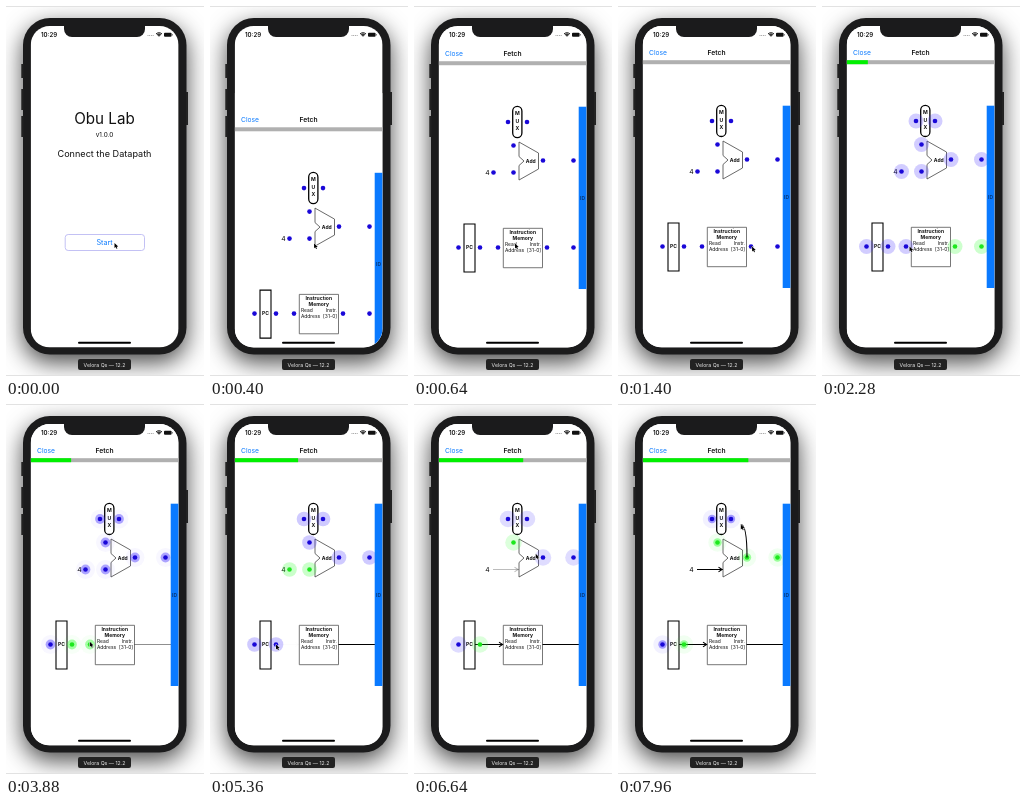
Write an HTML page with a canvas that moves like this. It is 198 px wide and 370 px high and loops after 8000 ms.

```html
<!DOCTYPE html>
<html lang="en">
<head>
<meta charset="utf-8">
<title>Datapath app demo</title>
<style>
html, body { margin: 0; width: 100%; height: 100%; overflow: hidden; background: #fff; }
canvas { display: block; width: 198px; height: 370px; }
</style>
</head>
<body>
<canvas id="stage"></canvas>
<script>
const W = 198, H = 370, LOOP = 8000;
const canvas = document.getElementById('stage');
const ctx = canvas.getContext('2d');
const dpr = window.devicePixelRatio || 1;
canvas.width = W * dpr;
canvas.height = H * dpr;

const FONT = 'Inter, Roboto, "Liberation Sans", sans-serif';
const BLUE = '#0a7aff', INK = '#1b1b1c', MID = 98.5;
const screen = { x: 24.7, y: 20, w: 147.9, h: 321.5 };
const clamp = v => Math.max(0, Math.min(1, v));
const smooth = v => { v = clamp(v); return v * v * (3 - 2 * v); };

// Rows and columns shared by the diagram parts
const BUS = 240.5, ADD_IN = 99.5, ADD_MID = 153.5, ADD_LOW = 165.5, MUX_MID = 115, ID_X = 159.5;
const nodes = {
  muxIn: [94, MUX_MID], muxOut: [113, MUX_MID],
  addTop: [ADD_IN, 138.5], addLow: [ADD_IN, ADD_LOW], addOut: [129, ADD_MID],
  four: [79.5, ADD_LOW], idTop: [ID_X, ADD_MID],
  pcIn: [44.5, BUS], pcOut: [66, BUS],
  memIn: [84, BUS], memOut: [133, BUS], idLow: [ID_X, BUS]
};

// Links in the order they are made; the wire fades in once the green hint ends.
const GREEN_TIME = 1600, WIRE_FADE = 1000;
const links = [
  { at: 1840, from: 'memOut', to: 'idLow', wire: [128.5, 165], hide: ['memOut', 'idLow'] },
  { at: 3750, from: 'pcOut', to: 'memIn', wire: [61, 89], arrow: true, hide: ['memIn'] },
  { at: 4780, from: 'four', to: 'addLow', wire: [79, 104.5], arrow: true, hide: ['four', 'addLow'] },
  { at: 6370, from: 'pcOut', to: 'addTop', hide: [] },
  { at: 7320, from: 'addOut', to: 'idTop', hide: [] },
  { at: 8170, from: 'addOut', to: 'muxOut', hide: [] }
];

// The pointer rests after each link, then travels at a steady pace to the next one.
const DRAG = 500, REST = 80;
const legs = [];
function addLeg(start, to, time, drag) {
  const from = legs.length ? legs[legs.length - 1].to : [108.5, 237];
  time ??= 150 + 4 * Math.hypot(to[0] - from[0], to[1] - from[1]);
  legs.push({ start, from, to, time, drag });
}
addLeg(300, [101, 237.5]);
let free = 800;
for (const l of links) {
  addLeg(free, nodes[l.from]);
  addLeg(l.at - DRAG, nodes[l.to], DRAG, true);
  free = l.at + REST;
}

const legAt = t => legs.findLast(l => t >= l.start) || legs[0];

function pointer(t) {
  const { start, from: [x0, y0], to: [x1, y1], time, drag } = legAt(t);
  const k = smooth((t - start) / time);
  // Drags leave vertically and bend towards their end.
  return drag && x0 !== x1 && y0 !== y1
    ? [x0 + (x1 - x0) * k * k, y0 + (y1 - y0) * k * (2 - k)]
    : [x0 + (x1 - x0) * k, y0 + (y1 - y0) * k];
}

function text(str, x, y, size, { weight = 400, color = '#111', align = 'center' } = {}) {
  ctx.font = `${weight} ${size}px ${FONT}`;
  ctx.textAlign = align;
  ctx.fillStyle = color;
  ctx.fillText(str, x, y);
}

function rect(x, y, w, h, color) {
  ctx.fillStyle = color;
  ctx.fillRect(x, y, w, h);
}

function round(x, y, w, h, r) {
  ctx.beginPath();
  ctx.roundRect(x, y, w, h, r);
}

function fill(color) {
  ctx.fillStyle = color;
  ctx.fill();
}

function disc(x, y, r, color) {
  ctx.beginPath();
  ctx.arc(x, y, r, 0, Math.PI * 2);
  fill(color);
}

function poly(points, close = true) {
  ctx.beginPath();
  points.forEach(([x, y]) => ctx.lineTo(x, y));
  if (close) ctx.closePath();
}

function stroke(color, width) {
  ctx.strokeStyle = color;
  ctx.lineWidth = width;
  ctx.stroke();
}

function phone() {
  rect(0, 0, W, H, '#fff');
  ctx.save();
  ctx.shadowColor = 'rgba(0,0,0,.72)';
  ctx.shadowBlur = 23 * dpr;
  ctx.shadowOffsetY = 8 * dpr;
  round(17, 12, 163.5, 336.5, 27);
  fill(INK);
  ctx.restore();
  rect(0, 0, W, 1, '#e2e2e2');
  rect(0, H - 1, W, 1, '#e2e2e2');
  [[58, 14], [83, 21], [110, 21]].forEach(([y, h]) => rect(15.3, y, 2.2, h, '#222'));
  rect(180, 86, 2, 33, '#222');
  round(72, 353, 53, 11, 2);
  fill('#222');
  text('Velora Qs — 12.2', MID, 360.6, 5.2, { color: '#eee' });
}

function statusBar() {
  round(58, 17, 81, 14, [0, 0, 8, 8]);
  fill(INK);
  text('10:29', 43, 31, 6.1, { weight: 600 });
  for (let i = 0; i < 4; i++) disc(142 + i * 1.7, 29.6, 0.5, '#888');
  for (let i = 1; i < 4; i++) {
    ctx.beginPath();
    ctx.arc(153, 31, i * 1.4, -Math.PI * 0.75, -Math.PI * 0.25);
    stroke('#000', 1);
  }
  round(158, 26.7, 7.6, 4, 1);
  fill('#111');
  rect(166, 28, 0.7, 1.5, '#555');
}

function startScreen(t) {
  rect(screen.x, screen.y, screen.w, screen.h, '#fff');
  text('Obu Lab', MID, 118, 15.2);
  text('v1.0.0', MID, 130.6, 6.4);
  text('Connect the Datapath', MID, 150.8, 9.1);
  round(59.2, 228.5, 79.3, 16, 3);
  stroke('#b4b1f2', 0.8);
  const pressed = t >= 60 && t < 260;
  text('Start', MID, 239.3, 7.2, { color: pressed ? '#a8cbf5' : BLUE });
}

function progress(t) {
  const done = links.reduce((n, l) => n + smooth((t - l.at) / 160), 0);
  rect(screen.x, 54.2, screen.w, 4, '#b0b0b0');
  rect(screen.x, 54.2, screen.w * done / 7, 4, '#00f000');
}

function parts() {
  round(98.7, 99.3, 9.2, 31.2, 4.6);
  stroke('#000', 1.3);
  [...'MUX'].forEach((c, i) => text(c, 103.3, 108.4 + i * 7.2, 5.1, { weight: 700 }));

  poly([[105, 135], [124.5, 146], [124.5, 162], [105, 173], [105, 158.5], [110, 154], [105, 149.5]]);
  stroke('#444', 0.8);
  text('Add', 116.8, 155.5, 5, { weight: 700 });
  text('4', 73.5, 168, 6.8);

  ctx.beginPath();
  ctx.rect(50, 217, 11, 48);
  stroke('#000', 1.1);
  text('PC', 55.5, 242.3, 5.1, { weight: 700 });

  ctx.beginPath();
  ctx.rect(89.3, 221.3, 39.2, 39.4);
  stroke('#555', 0.8);
  ['Instruction', 'Memory'].forEach((s, i) => text(s, 108.7, 227.3 + i * 5.8, 5, { weight: 700 }));
  [['Read', 'Instr.'], ['Address', '[31-0]']].forEach(([a, b], i) => {
    text(a, 91, 239.2 + i * 6, 4.9, { align: 'left' });
    text(b, 127, 239.2 + i * 6, 4.9, { align: 'right' });
  });
}

function wires(t) {
  for (const l of links) {
    const k = clamp((t - l.at - GREEN_TIME) / WIRE_FADE);
    if (!l.wire || !k) continue;
    const [x0, x1] = l.wire, y = nodes[l.from][1];
    ctx.globalAlpha = k;
    poly([[x0, y], [x1, y]], false);
    stroke('#000', 1.1);
    if (l.arrow) {
      poly([[x1 - 4, y - 2.4], [x1 - 0.4, y], [x1 - 4, y + 2.4]], false);
      stroke('#000', 1.1);
    }
    ctx.globalAlpha = 1;
  }
}

// Each pulse outlives its period, so young rings overlap a faint old one.
const PULSE = 1040, PULSE_START = 1531, PULSE_LIFE = 1.35;

function halo(x, y, t, rgb) {
  const age = (t - PULSE_START) / PULSE;
  for (let p = age % 1; p < PULSE_LIFE && p <= age; p++) {
    disc(x, y, 8.6 * p ** 0.42, `rgba(${rgb},${0.5 * (1 - p / PULSE_LIFE)})`);
  }
}

function dots(t) {
  const hidden = new Set(), green = new Set();
  for (const l of links) {
    if (t < l.at) continue;
    if (t < l.at + GREEN_TIME) green.add(l.from).add(l.to);
    else l.hide.forEach(n => hidden.add(n));
  }
  for (const name in nodes) {
    if (hidden.has(name)) continue;
    const [x, y] = nodes[name], on = green.has(name);
    if (t > PULSE_START) halo(x, y, t, on ? '40,255,40' : '60,40,255');
    disc(x, y, 2.3, on ? '#1ee81e' : '#1a08d8');
  }
}

function dragLine(t) {
  const leg = legAt(t);
  if (!leg.drag || t >= leg.start + leg.time) return;
  const [x0, y0] = leg.from, [x1, y1] = pointer(t);
  ctx.beginPath();
  ctx.moveTo(x0, y0);
  ctx.quadraticCurveTo(x0, y1, x1, y1);
  stroke('#000', 1.1);
}

function fetchScreen(t) {
  // Modal rises on a critically damped spring.
  const tau = (t - 260) / 48;
  if (tau < 0) return;
  ctx.save();
  ctx.translate(0, screen.h * (1 + tau) * Math.exp(-tau));
  rect(screen.x, screen.y, screen.w, screen.h, '#fff');
  text('Close', 31, 48.9, 6.7, { color: BLUE, align: 'left' });
  text('Fetch', MID, 48.9, 6.7, { weight: 600 });
  progress(t);
  parts();
  wires(t);
  dots(t);
  dragLine(t);
  rect(164.7, 99.7, 7.9, 182.3, BLUE);
  text('ID', 168.6, 192.8, 5, { weight: 600, color: '#06326e' });
  ctx.restore();
}

function cursor(t) {
  ctx.save();
  ctx.translate(...pointer(t));
  poly([[0, 0], [0, 5], [1.2, 4], [2, 5.8], [2.9, 5.4], [2.1, 3.7], [3.7, 3.6]]);
  ctx.lineJoin = 'round';
  stroke('#fff', 0.9);
  fill('#000');
  ctx.restore();
}

function draw(t) {
  ctx.setTransform(dpr, 0, 0, dpr, 0, 0);
  phone();
  ctx.save();
  round(screen.x, screen.y, screen.w, screen.h, 19);
  ctx.clip();
  startScreen(t);
  fetchScreen(t);
  statusBar();
  round(72, 335.8, 53, 2, 1);
  fill('#000');
  ctx.restore();
  cursor(t);
}

const begin = performance.now();
function tick() {
  draw((performance.now() - begin) % LOOP);
  requestAnimationFrame(tick);
}
tick();
</script>
</body>
</html>
```
